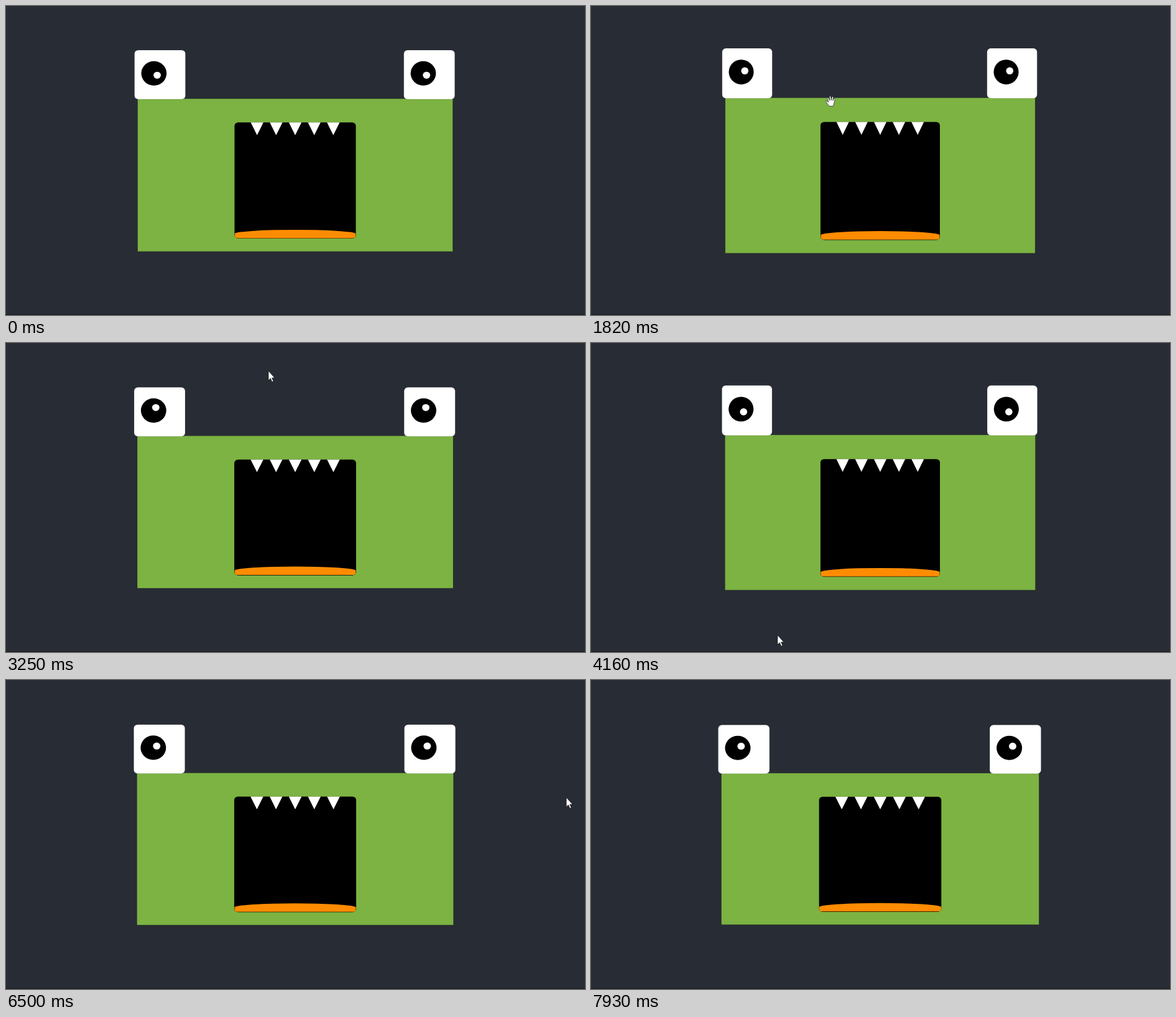
Write an HTML page that moves like this. It is 931 by 497 pixels and loops after 8 s.

```html
<!DOCTYPE html>
<html lang="en">
<head>
<meta charset="utf-8">
<title>Monster</title>
<style>
  html, body { margin: 0; width: 100%; height: 100%; overflow: hidden; background: #282c34; }
  svg { display: block; }
</style>
</head>
<body>
<svg width="931" height="497" viewBox="0 0 931 497">
  <defs>
    <clipPath id="lips"><rect x="369" y="186.5" width="192" height="190.2" rx="6"/></clipPath>
    <g id="eye">
      <rect width="80.4" height="80.6" rx="6" fill="#fff" stroke="#000" stroke-opacity=".25" stroke-width=".6"/>
      <circle cx="30.7" cy="38.1" r="20"/>
      <circle class="glint" r="5.8" fill="#fff"/>
    </g>
    <path id="tooth" d="M-10 186.5h20l-10 20.8z" fill="#fff"/>
  </defs>
  <rect width="931" height="497" fill="#282c34"/>
  <rect y="496" width="931" height="1" fill="#17191d"/>
  <g id="monster">
    <rect x="216.2" y="147.6" width="497.6" height="250.2" fill="#7cb342" stroke="#000" stroke-opacity=".25" stroke-width=".6"/>
    <g clip-path="url(#lips)">
      <rect x="369" y="186" width="192" height="191"/>
      <path d="M369.6 368.4A95.6 6.6 0 0 1 560.4 368.4V376H369.6z" fill="#ff8c00"/>
    </g>
    <g id="teeth"></g>
    <use href="#eye" x="211.2" y="67.9"/>
    <use href="#eye" x="636.6" y="67.9"/>
  </g>
  <g id="pointer" stroke="#15171b" stroke-width=".7" stroke-linejoin="round" fill="#fff">
    <path id="arrow" d="M0 0V15L3.3 11.9L5.8 17.5L8 16.5L5.6 11.1H10z"/>
    <path id="hand" d="M4 16L-1 9.5Q-2 7.5 0 7.5L3 10L1 3.5Q1 1.8 2.6 2.6L4.7 7L4.4 1Q5.4-1 6.6 1L7.2 6.8L8.4 1.2Q9.8 0 10.5 1.6L9.8 7.2L11.7 3.7Q13.4 3.2 13.2 5L11.4 13L10.6 16z"/>
  </g>
</svg>
<script>
const LOOP = 8000, STEP = 130, WOBBLE = 1074;
const $ = id => document.getElementById(id);

// Stops of the mouse: time, x, y
const stops = [
  [910, 430, 500], [1820, 379, 145], [2340, 108, 28], [3250, 422, 45], [4160, 300, 470],
  [4680, 0, 250], [5330, 31, 59], [6500, 901, 189], [7150, 914, 470], [7930, 940, 165]
];

function mouseAt(t) {
  const i = stops.findIndex(s => s[0] >= t);
  const [t1, x1, y1] = stops[i], [t0, x0, y0] = stops[Math.max(i - 1, 0)];
  const k = t1 > t0 ? (t - t0) / (t1 - t0) : 1;
  const s = k * k * (3 - 2 * k);
  return [x0 + (x1 - x0) * s, y0 + (y1 - y0) * s];
}

// cubic-bezier(.25, .1, .25, 1)
function ease(x) {
  let lo = 0, hi = 1, u;
  for (let i = 0; i < 20; i++) {
    u = (lo + hi) / 2;
    if (.75 * u * (1 - u) + u ** 3 < x) lo = u; else hi = u;
  }
  return .3 * u * (1 - u) ** 2 + 3 * u * u * (1 - u) + u ** 3;
}

$('teeth').innerHTML = [-2, -1, 0, 1, 2].map(i => `<use href="#tooth" x="${465 + i * 30.1}"/>`).join('');
const glint = document.querySelector('.glint');

function draw(now) {
  const t = Math.floor(now % LOOP / STEP) * STEP;

  const phase = (.175 + t / WOBBLE) % 1;
  const squash = .03 * (phase < .5 ? ease(phase * 2) : 1 - ease(phase * 2 - 1));
  $('monster').setAttribute('transform',
    `translate(465 233) scale(${1 + squash} ${1 - squash}) translate(-465 -233)`);

  // Both eyes follow the mouse as seen from the left one, turned back a little
  const [x, y] = mouseAt(t);
  const angle = Math.atan2(y - 108, x - 251) - .6;
  glint.setAttribute('cx', 30.7 + 6 * Math.cos(angle));
  glint.setAttribute('cy', 38.1 + 6 * Math.sin(angle));

  const over = x > 212 && x < 718 && y > 140 && y < 397;
  $('pointer').setAttribute('transform', `translate(${x} ${y})`);
  $('arrow').style.display = over ? 'none' : '';
  $('hand').style.display = over ? '' : 'none';
}

function tick() {
  draw(performance.now());
  requestAnimationFrame(tick);
}
tick();
</script>
</body>
</html>
```
